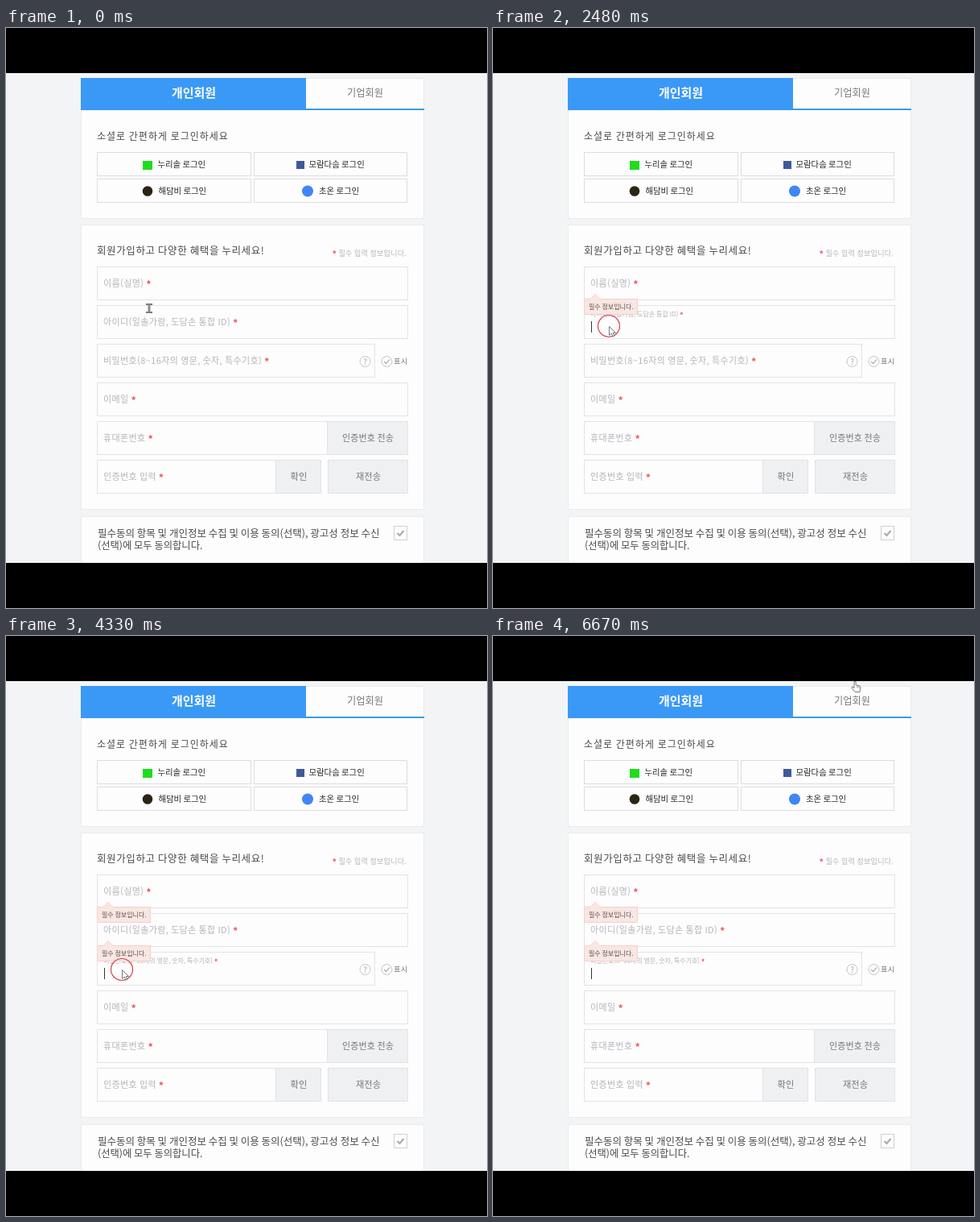
An HTML page with a canvas that plays this animation: 598 by 720 pixels, repeating every 6700 ms.

```html
<!DOCTYPE html>
<html lang="ko">
<head>
<meta charset="utf-8">
<style>
html, body { margin: 0; width: 100%; height: 100%; overflow: hidden; background: #000; }
canvas { display: block; }
</style>
</head>
<body>
<canvas id="stage" width="598" height="720"></canvas>
<script>
const ctx = document.getElementById('stage').getContext('2d');
const LOOP = 6700;
const FONT = '"Noto Sans CJK KR", "Noto Sans CJK", "Noto Sans CJK JP", sans-serif';
const C = {
  page: '#f2f4f5', panel: '#fdfdfd', edge: '#e9ebee', line: '#e2e2ea',
  button: '#eef0f2', label: '#b4b4bc', star: '#ee5a62', ink: '#4a4a4c',
  dark: '#28282a', muted: '#77777b', blue: '#3a99f6', bar: '#3a9fe0',
  tip: '#fae6e2', tipEdge: '#f2d2cd', icon: '#c4c5ca', cursor: '#77777a'
};

// Moments when each field takes the focus
const FOCUS = [250, 2400, 4230];
const BLINK = 530;

const FIELDS = [
  { y: 296, w: 387, text: '이름(실명)' },
  { y: 344, w: 387, text: '아이디(일솔가람, 도담손 통합 ID)' },
  { y: 392, w: 346, text: '비밀번호(8~16자의 영문, 숫자, 특수기호)' },
  { y: 440, w: 387, text: '이메일' },
  { y: 488, w: 387, text: '휴대폰번호' },
  { y: 536, w: 279, text: '인증번호 입력' }
];

// Pointer stops: time, x, y
const PATH = [
  [0, 178, 348], [30, 178, 348], [230, 195, 326], [1150, 195, 326],
  [1750, 146.5, 368.5], [2150, 146.5, 368.5], [2350, 144.5, 370.5],
  [3650, 144.5, 370.5], [4130, 144.5, 414.5], [5740, 144.5, 414.5],
  [6390, 450, 56], [LOOP, 450, 56]
];

function rect(x, y, w, h, fill, stroke) {
  if (fill) { ctx.fillStyle = fill; ctx.fillRect(x, y, w, h); }
  if (stroke) {
    ctx.strokeStyle = stroke;
    ctx.lineWidth = 1;
    ctx.strokeRect(x + .5, y + .5, w - 1, h - 1);
  }
}

function disc(x, y, r, fill, stroke, width = 1) {
  ctx.beginPath();
  ctx.arc(x, y, r, 0, Math.PI * 2);
  if (fill) { ctx.fillStyle = fill; ctx.fill(); }
  if (stroke) { ctx.strokeStyle = stroke; ctx.lineWidth = width; ctx.stroke(); }
}

function poly(points, fill, stroke, width = 1, close = true) {
  ctx.beginPath();
  points.forEach(([x, y], i) => i ? ctx.lineTo(x, y) : ctx.moveTo(x, y));
  if (close) ctx.closePath();
  if (fill) { ctx.fillStyle = fill; ctx.fill(); }
  if (stroke) { ctx.strokeStyle = stroke; ctx.lineWidth = width; ctx.stroke(); }
}

// Text centred vertically on y; returns the x where it ends
function text(str, x, y, size, color, { gap = 0, weight = 400, align = 'left' } = {}) {
  ctx.font = `${weight} ${size}px ${FONT}`;
  ctx.letterSpacing = gap + 'px';
  ctx.textAlign = align;
  ctx.fillStyle = color;
  ctx.fillText(str, x, y + size * .37);
  return x + ctx.measureText(str).width;
}

function star(x, y, size) {
  text('*', x, y + size * .2, size * 1.15, C.star, { weight: 700 });
}

function starred(str, x, y, size, gap) {
  star(text(str + ' ', x, y, size, C.label, { gap }), y, size);
}

function panel(y, h) {
  rect(93, y, 427, h, C.panel, C.edge);
}

function tick(x, y, s, color, width) {
  poly([[x - s, y], [x - s * .25, y + s * .75], [x + s, y - s * .75]], null, color, width, false);
}

function social(x, y, w, label, labelX, icon) {
  rect(x, y, w, 30, C.panel, '#dddde2');
  text(label, labelX, y + 15, 10.4, C.dark);
  icon();
}

function tabs() {
  panel(62, 175);
  rect(93, 62, 280, 40, C.blue);
  rect(373, 100, 147, 2, C.bar);
  text('개인회원', 233.5, 80.5, 15, '#fff', { weight: 700, align: 'center' });
  text('기업회원', 446.5, 80, 12.2, C.muted, { align: 'center' });

  text('소셜로 간편하게 로그인하세요', 113, 134.5, 12, C.ink, { gap: 1 });
  social(113, 154, 192, '누리솔 로그인', 188.5, () => rect(170, 165, 12, 11, '#1fdc1f'));
  social(308, 154, 191, '모람다솜 로그인', 376.5, () => rect(361, 165, 10, 10, '#3f5a9a'));
  social(113, 187, 192, '해담비 로그인', 189.5, () => disc(176, 202.5, 6.3, '#2b2412'));
  social(308, 187, 191, '초온 로그인', 389, () => disc(375, 202.5, 7, '#4285f4'));
}

function form(t, active) {
  panel(244, 354);
  text('회원가입하고 다양한 혜택을 누리세요!', 113, 276, 12.5, C.ink, { gap: .6 });
  star(405.5, 279.5, 9.5);
  text('필수 입력 정보입니다.', 413.5, 279.5, 9, C.label, { gap: .3 });

  FIELDS.forEach((f, i) => {
    rect(113, f.y, f.w, 42, null, C.line);
    if (i === active) starred(f.text, 121, f.y + 11, 8, 0);
    else starred(f.text, 121, f.y + 20.5, 11, .4);
  });

  rect(399, 488, 101, 42, C.button, C.line);
  rect(335, 536, 57, 42, C.button, C.line);
  rect(400, 536, 100, 42, C.button, C.line);
  const mid = { align: 'center', gap: .1 };
  text('인증번호 전송', 450, 508.5, 11, C.muted, mid);
  text('확인', 364, 556.5, 11.2, C.muted, mid);
  text('재전송', 450.5, 556.5, 11.2, C.muted, mid);

  disc(446.5, 414, 6.5, null, C.icon);
  text('?', 446.5, 414, 10, '#a6a7ac', { align: 'center' });
  disc(473.5, 414, 6.5, null, C.icon);
  tick(473.5, 414, 3.5, '#acadb2', 1.2);
  text('표시', 482, 413.5, 9.4, C.muted);

  for (let i = 0; i < active; i++) tooltip(FIELDS[i].y + 40);

  if (active >= 0 && (t - FOCUS[active]) % (2 * BLINK) < BLINK) {
    rect(122, FIELDS[active].y + 20, 1, 14, '#333');
  }
}

function tooltip(y) {
  rect(113, y, 67, 20, C.tip, C.tipEdge);
  poly([[121, y + 1], [127, y - 5.5], [133, y + 1]], C.tip);
  poly([[121, y + .5], [127, y - 5.5], [133, y + .5]], null, C.tipEdge, 1, false);
  text('필수 정보입니다.', 119, y + 10.3, 8, '#5e5250');
}

function consent() {
  panel(606, 60);
  text('필수동의 항목 및 개인정보 수집 및 이용 동의(선택), 광고성 정보 수신', 114, 627, 12.5, C.ink);
  text('(선택)에 모두 동의합니다.', 114, 642.5, 12.3, C.ink);
  rect(482, 618, 17, 18, null, '#cfd0d4');
  tick(490.5, 627, 4, '#a9aaae', 2);
}

function pointerAt(t) {
  let i = 1;
  while (i < PATH.length - 1 && t > PATH[i][0]) i++;
  const [t0, x0, y0] = PATH[i - 1], [t1, x1, y1] = PATH[i];
  const k = Math.min(1, Math.max(0, (t - t0) / (t1 - t0)));
  const e = k * k * (3 - 2 * k);
  return [x0 + (x1 - x0) * e, y0 + (y1 - y0) * e];
}

const shapes = {
  beam() {
    rect(-4, -6, 8, 2, C.cursor);
    rect(-4, 4, 8, 2, C.cursor);
    rect(-1.5, -5, 3, 10, '#8d8d90');
  },
  watch() {
    rect(-3, -7, 6, 13, '#a9793f');
    disc(0, -.5, 4.3, '#fbf6ea', '#94602c', 1.6);
    poly([[0, -3], [0, 0], [2, 0]], null, '#94602c', 1, false);
  },
  arrow() {
    poly([[0, 0], [0, 11], [2.6, 8.6], [4.6, 12.6], [6.4, 11.7], [4.6, 8], [8, 8]],
      '#fff', C.cursor);
  },
  hand() {
    poly([[-1, .5], [1, .5], [1.2, 5], [6, 6], [7, 7.5], [6, 13.5], [0, 13.5],
      [-4, 8.5], [-3.5, 7], [-1, 8.5]], '#fff', C.cursor);
    poly([[3, 6], [3, 8.5]], null, C.cursor, .8, false);
    poly([[5, 6.5], [5, 8.5]], null, C.cursor, .8, false);
  }
};

function pointer(t) {
  const [x, y] = pointerAt(t);
  const click = FOCUS.find(f => t >= f && t < f + 210);
  if (click !== undefined) disc(x - .5, y - .5, 13.5, null, '#d84048', 1.2);
  let kind = 'arrow';
  if (t < FOCUS[0]) kind = 'beam';
  else if (t < 1150) kind = 'watch';
  else if (x > 373 && y < 100) kind = 'hand';
  ctx.save();
  ctx.translate(x, y);
  shapes[kind]();
  ctx.restore();
}

function draw(t) {
  const active = FOCUS.filter(f => t >= f).length - 1;
  rect(0, 0, 598, 720, '#000');
  ctx.save();
  ctx.beginPath();
  ctx.rect(0, 56, 598, 608);
  ctx.clip();
  rect(0, 56, 598, 608, C.page);
  tabs();
  form(t, active);
  consent();
  pointer(t);
  ctx.restore();
}

const start = performance.now();
function play() {
  draw((performance.now() - start) % LOOP);
  requestAnimationFrame(play);
}
play();
</script>
</body>
</html>
```
